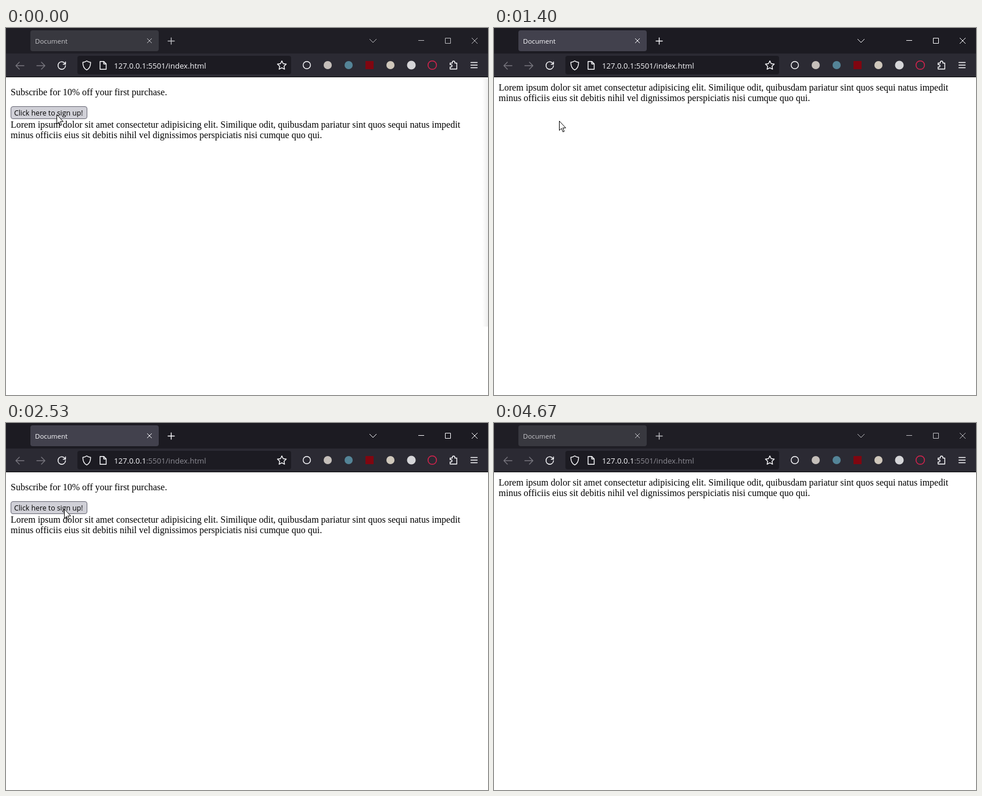
Recreate the animation shown at these times as an HTML page. Size 830 by 633 pixels, loop 4740 ms.

```html
<!DOCTYPE html>
<html lang="en">
<head>
<meta charset="utf-8">
<title>Sign-up demo</title>
<style>
  html, body { margin: 0; width: 100%; height: 100%; overflow: hidden; background: #fff; }
  svg { display: block; }
  .ui { font-family: "Open Sans", "Noto Sans", sans-serif; white-space: pre; }
  .page { font: 16px "Liberation Serif", "Times New Roman", serif; }
  .line { fill: none; stroke: #fbfbfe; stroke-width: 1.4; stroke-linecap: round; stroke-linejoin: round; }
  .thin { fill: none; stroke: #fbfbfe; stroke-width: 1; }
</style>
</head>
<body>
<svg width="830" height="633" viewBox="0 0 830 633">
  <defs>
    <clipPath id="tabClip"><rect x="42" y="4" width="221" height="36" rx="4"/></clipPath>
    <linearGradient id="edge"><stop stop-opacity="0"/><stop offset="1" stop-opacity=".07"/></linearGradient>
  </defs>

  <!-- page -->
  <rect width="830" height="633" fill="#fff"/>
  <g class="page">
    <g id="popup">
      <text x="8" y="116">Subscribe for 10% off your first purchase.</text>
      <rect id="button" x="8.5" y="135.5" width="131" height="21" rx="3.5"/>
      <text class="ui" x="14" y="151" font-size="12.3">Click here to sign up!</text>
    </g>
    <g id="lorem">
      <text x="8" y="108">Lorem ipsum dolor sit amet consectetur adipisicing elit. Similique odit, quibusdam pariatur sint quos sequi natus impedit</text>
      <text x="8" y="126">minus officiis eius sit debitis nihil vel dignissimos perspiciatis nisi cumque quo qui.</text>
    </g>
  </g>
  <rect id="shade" x="820" y="85" width="10" height="430" fill="url(#edge)"/>

  <!-- title bar -->
  <rect id="bar" width="830" height="44"/>
  <rect id="tab" x="42" y="4" width="221" height="36" rx="4"/>
  <rect id="burst" x="42" y="4" height="36" fill="#394f70" clip-path="url(#tabClip)"/>
  <g id="titleBar">
    <circle id="dot" cy="22" r="2" fill="#b5b4c0"/>
    <text id="title" class="ui" y="27" font-size="11.5" fill="#fbfbfe">Document</text>
    <path class="thin" d="M243 18l8 8m0-8l-8 8"/>
    <path class="line" stroke-linecap="butt" d="M279 22.5h11M284.5 17v11"/>
    <path class="thin" stroke-width="1.2" d="M626 19l6 6 6-6"/>
    <path class="thin" d="M710 21.5h10M756.5 17.5h9v9h-9zM802 17l10 10m0-10l-10 10"/>
  </g>

  <!-- toolbar -->
  <rect y="44" width="830" height="40" fill="#2b2a33"/>
  <rect y="84" width="830" height="1" fill="#0c0c0d"/>
  <rect x="123" y="48" width="368" height="32" rx="4" fill="#1c1b22"/>
  <g class="line">
    <path stroke="#77767e" d="M31 65H17.5M23 59l-6 6 6 6M53 65h13.5M61 59l6 6-6 6"/>
    <path d="M101.5 61.2A6.5 6.5 0 1 0 102.5 65M102.5 58.5v4h-4"/>
    <path d="M139 56.8c2 1.6 4.2 2.2 6.7 2.4 0 6-1.2 10.4-6.7 13.2-5.500-2.800-6.700-7.200-6.700-13.200 2.500-.2 4.700-.8 6.700-2.400z"/>
    <path d="M162 57.700h6.500l4 4v9.600H162zM168.300 58v4h4"/>
    <path id="star"/>
    <circle cx="518" cy="64" r="6.300"/>
    <path d="M764.700 60.500h3.800v-1.300a2.200 2.200 0 0 1 4.400 0v1.300h3.400v10.300h-11.600v-3.500h1.300a2 2 0 0 0 0-4h-1.300z"/>
    <path d="M800.500 59.500h11M800.500 64h11M800.500 68.500h11"/>
  </g>
  <circle cx="554" cy="64" r="7" fill="#c5bfba"/>
  <circle cx="590" cy="64" r="7" fill="#548497"/>
  <rect x="619" y="57" width="14" height="14" fill="#800610"/>
  <circle cx="662" cy="64" r="7" fill="#cfc7bb"/>
  <circle cx="698" cy="64" r="7.500" fill="#d5d5d8"/>
  <circle cx="734" cy="64" r="7.300" fill="none" stroke="#d8234e" stroke-width="1.500"/>
  <text class="ui" x="186" y="70" font-size="13.1" fill="#fbfbfe">127.0.0.1<tspan id="path">:5501/index.html</tspan></text>

  <path id="cursor" fill="#fff" stroke="#000" d="M.5.5V16.700L4.200 13.200 6.700 19.200 9 18.200 6.500 12.300H11.500Z"/>
</svg>
<script>
const LOOP = 4740, STEP = 200 / 3;
const $ = id => document.getElementById(id);
const set = (id, attrs) => {
  for (const name in attrs) $(id).setAttribute(name, attrs[name]);
};
const show = (id, on) => set(id, { visibility: on ? 'visible' : 'hidden' });

// Cursor path: tick, x, y
const route = [
  [0, 87, 149], [1, 87, 148], [7, 87, 148], [8, 86, 148],
  [20, 86, 148], [21, 112, 160], [22, 185, 192], [23, 255, 219], [24, 277, 225],
  [32, 277, 225], [33, 275, 225], [34, 252, 214], [35, 202, 189], [36, 145, 163],
  [37, 109, 151], [38, 100, 148], [56, 100, 148], [57, 101, 172], [58, 103, 226],
  [60, 102, 355], [62, 97, 496], [64, 87, 602], [65, 84, 622], [66, 82, 640]
];

function cursorAt(tick) {
  const next = route.findIndex(p => p[0] >= tick);
  if (next < 0) return [82, 640];
  const b = route[next], a = route[Math.max(0, next - 1)];
  const f = (tick - a[0]) / (b[0] - a[0] || 1);
  return [a[1] + (b[1] - a[1]) * f, a[2] + (b[2] - a[2]) * f].map(Math.round);
}

const buttonStyles = {
  idle: ['#e9e9ed', '#8f8f9d'],
  hover: ['#d0d0d7', '#676774'],
  pressed: ['#b1b1b9', '#484851']
};

function draw(time) {
  const tick = Math.floor((time % LOOP + 3.4) / STEP);
  const focused = tick >= 5 && tick < 69;
  const loading = tick === 30 || tick === 31;
  const popup = tick < 7 || (tick >= 32 && tick < 52);
  const state = tick === 6 || tick === 51 ? 'pressed'
    : tick < 6 || tick >= 37 ? 'hover' : 'idle';
  const [fill, stroke] = buttonStyles[state];
  const burst = tick - 32;

  show('popup', popup);
  set('button', { fill, stroke });
  set('lorem', { transform: `translate(0 ${popup ? 64 : 0})` });
  show('shade', tick < 5);

  set('bar', { fill: focused ? '#1c1b22' : '#1f1e25' });
  set('tab', { fill: focused ? '#42414d' : '#38383f' });
  set('titleBar', { opacity: focused ? 1 : 0.72 });
  set('title', { x: loading ? 72 : 50 });
  show('dot', loading);
  set('dot', { cx: tick === 31 ? 58 : 52 });
  show('burst', burst > 0 && burst < 5);
  set('burst', { width: burst === 1 ? 145 : 221, opacity: Math.min(1, Math.max(0, 1.25 - burst / 4)) });
  set('path', { fill: tick < 32 ? '#fbfbfe' : '#8c8b93' });

  set('cursor', { transform: `translate(${cursorAt(tick)})` });
}

const starPoints = Array.from({ length: 10 }, (_, i) => {
  const r = i % 2 ? 3.9 : 8, a = (i / 5 - 0.5) * Math.PI;
  return `${475 + r * Math.cos(a)} ${64.700 + r * Math.sin(a)}`;
});
set('star', { d: `M${starPoints.join('L')}Z` });

const start = performance.now();
function loop() {
  draw(performance.now() - start);
  requestAnimationFrame(loop);
}
loop();
</script>
</body>
</html>
```
